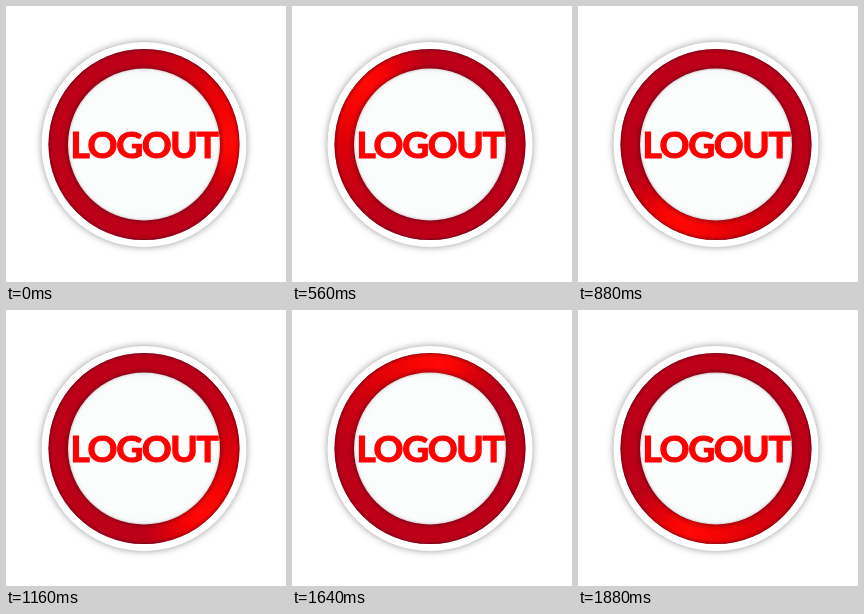
An HTML page with a canvas for the animation above (1920 ms loop, 280 px wide and 276 px high).

```html
<!DOCTYPE html>
<html>
<head>
<meta charset="utf-8">
<style>
html, body { margin: 0; width: 100%; height: 100%; overflow: hidden; background: #fff; }
canvas { display: block; }
</style>
</head>
<body>
<canvas id="stage" width="280" height="276"></canvas>
<script>
const ctx = document.getElementById('stage').getContext('2d');
const LOOP = 1920, STEP = 40, CX = 138, CY = 138.5;

// [time in ms, counterclockwise angle of the highlight in degrees]
const path = [[0, 2], [360, 84], [560, 136], [720, 204], [1120, 304],
  [1160, 312], [1480, 382], [1640, 444], [1880, 612], [1920, 640]];

// [degrees clockwise from the highlight's peak, colour]: long soft lead, short tail
const glow = [[-180, '#bd0018'], [-95, '#bd0018'], [-70, '#c80012'], [-45, '#dc000a'],
  [-20, '#f40404'], [0, '#ff0806'], [12, '#f60404'], [26, '#d8000c'],
  [42, '#bc0018'], [180, '#bd0018']];

function angleAt(time) {
  const i = path.findIndex(p => p[0] > time);
  const [t0, a0] = path[i - 1], [t1, a1] = path[i];
  return a0 + (a1 - a0) * (time - t0) / (t1 - t0);
}

function disc(r, fill) {
  ctx.fillStyle = fill;
  ctx.beginPath();
  ctx.arc(CX, CY, r, 0, 2 * Math.PI);
  ctx.fill();
}

function radial(r0, r1, stops) {
  const g = ctx.createRadialGradient(CX, CY, r0, CX, CY, r1);
  stops.forEach(([at, colour]) => g.addColorStop(at, colour));
  return g;
}

function ringFill(angle) {
  const g = ctx.createConicGradient(Math.PI - angle * Math.PI / 180, CX, CY);
  glow.forEach(([offset, colour]) => g.addColorStop(0.5 + offset / 360, colour));
  return g;
}

const rim = radial(75.5, 95.5, [[0, 'rgba(70,0,15,.55)'], [0.08, 'rgba(90,0,15,.3)'],
  [0.3, 'rgba(120,0,20,0)'], [0.78, 'rgba(120,0,20,0)'], [0.93, 'rgba(90,0,15,.25)'],
  [1, 'rgba(70,0,15,.6)']]);
const face = radial(70, 76, [[0, '#fafdfc'], [0.6, '#f7f9f8'], [1, '#dcd4d5']]);

function draw(time) {
  ctx.fillStyle = '#fff';
  ctx.fillRect(0, 0, 280, 276);

  ctx.save();
  ctx.shadowColor = 'rgba(0,0,0,.4)';
  ctx.shadowBlur = 7;
  disc(102.5, '#fff');
  ctx.restore();

  disc(95.5, ringFill(angleAt(time)));
  disc(95.5, rim);
  disc(76, face);

  ctx.font = 'bold 37px Lato, sans-serif';
  ctx.letterSpacing = '-1.3px';
  ctx.textAlign = 'center';
  ctx.lineJoin = 'miter';
  ctx.lineWidth = 1.2;
  ctx.fillStyle = ctx.strokeStyle = '#ff0000';
  ctx.fillText('LOGOUT', 138, 152.4);
  ctx.strokeText('LOGOUT', 138, 152.4);
}

function tick() {
  const time = performance.now() % LOOP;
  draw(Math.floor(time / STEP) * STEP);
  requestAnimationFrame(tick);
}
tick();
</script>
</body>
</html>
```
